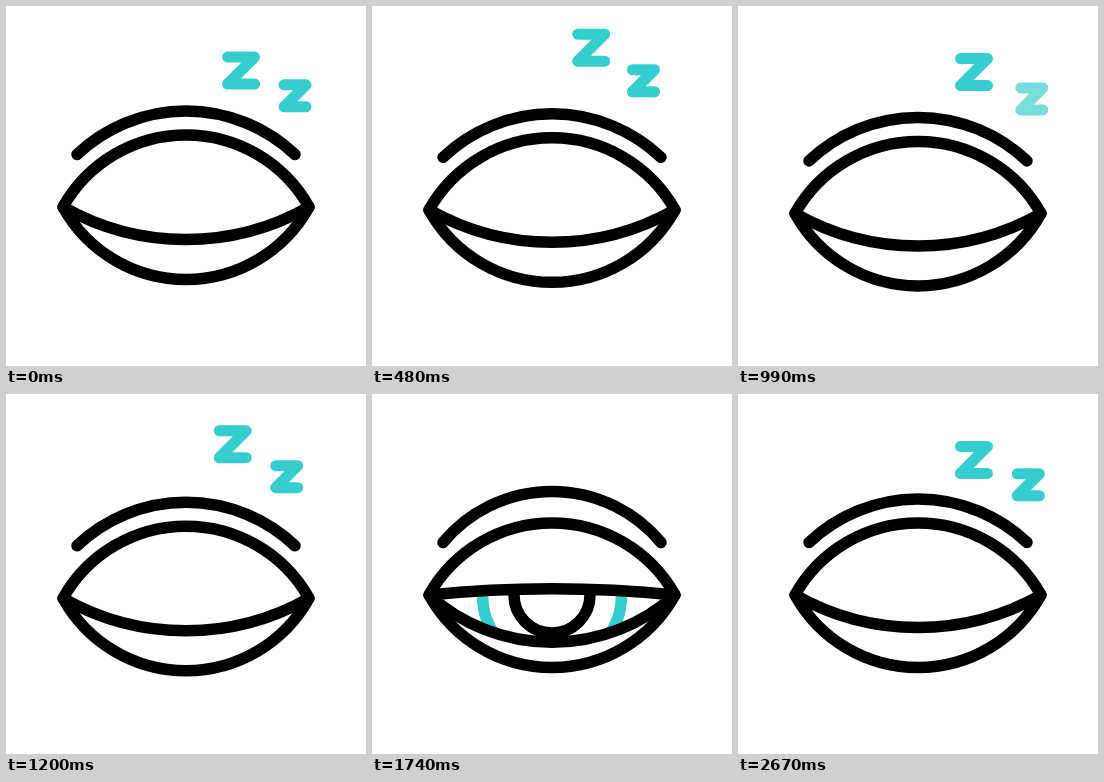
An HTML page with a canvas for the animation above (2700 ms loop, 360 by 360 pixels).

```html
<!DOCTYPE html>
<html lang="en">
<head>
<meta charset="utf-8">
<style>
  html, body { margin: 0; width: 100%; height: 100%; overflow: hidden; background: #fff; }
  canvas { display: block; }
</style>
</head>
<body>
<canvas width="360" height="360"></canvas>
<script>
const LOOP = 2700;
const BLACK = '#000', TEAL = '#35cdcd', GRAY = '#d6d6d6';
const ctx = document.querySelector('canvas').getContext('2d');
ctx.lineCap = ctx.lineJoin = 'round';

const ramp = (t, from, to) => Math.min(1, Math.max(0, (t - from) / (to - from)));
const mix = (a, b, k) => a + (b - a) * k;
const easeOut = k => 1 - (1 - k) ** 2;
const easeInOut = k => Math.sin(k * Math.PI / 2) ** 2;

// Circular arc command to (x, y) across a chord; positive sag hangs downward.
function arcTo(x, y, half, sag, clockwise) {
  const s = Math.max(Math.abs(sag), 0.01);
  const r = (half * half + s * s) / (2 * s);
  return `A${r} ${r} 0 0 ${+clockwise} ${x} ${y}`;
}

const curve = (y, half, sag) =>
  new Path2D(`M${180 - half} ${y}` + arcTo(180 + half, y, half, sag, sag < 0));

const lens = (top, bottom) => new Path2D(
  'M57 201' + arcTo(303, 201, 123, top, top < 0) + arcTo(57, 201, 123, bottom, bottom > 0) + 'Z');

function stroke(path, color = BLACK, width = 11.5) {
  ctx.strokeStyle = color;
  ctx.lineWidth = width;
  ctx.stroke(path);
}

function circle(y, radius) {
  const path = new Path2D();
  path.arc(180, y, radius, 0, Math.PI * 2);
  return path;
}

function drawEye(t) {
  const open = easeOut(ramp(t, 1640, 2130)) * (1 - easeOut(ramp(t, 2220, 2405)));
  const dip = 7.5 * easeInOut(ramp(t, 240, 810)) * easeInOut(ramp(t, 1530, 810));
  const upper = mix(32.5, -72, open), lower = mix(32.5, 72.5, open);

  ctx.save();
  ctx.translate(0, dip);
  stroke(curve(148.5, 109, mix(-43.5, -64, open)));
  if (open > 0) {
    ctx.save();
    ctx.clip(lens(upper, lower));
    stroke(circle(201, 69.5), TEAL);
    stroke(circle(201, 38));
    ctx.restore();
  }
  stroke(lens(upper, lower));
  stroke(lens(-72, 72.5));
  ctx.restore();
}

// A letter drifts up and left with a slight sway, fading at both ends.
function drawLetter(age, life, x, y, dx, dy, size) {
  if (age < 0 || age >= life) return;
  const k = (age / life) ** 1.1;
  const left = x - dx * k - 2.2 * Math.sin(k * Math.PI * 2) - size;
  const top = y - dy * k - size;
  const side = 2 * size;
  ctx.globalAlpha = ramp(age, 0, 180) * ramp(age, life, life - 70);
  stroke(new Path2D(`M${left} ${top}h${side}l${-side} ${side}h${side}`), TEAL, 11);
  ctx.globalAlpha = 1;
}

// Two letters, the second one delayed; a dot lingers after them until the rest ends.
function drawSnore(t, start, life, rest) {
  const delay = 120;
  const age = (t - start + LOOP) % LOOP;
  drawLetter(age, life, 251, 82, 38, 46, 13.5);
  drawLetter(age - delay, life, 303, 98, 45, 31, 11);
  if (age >= life + delay && age < life + delay + rest) {
    ctx.fillStyle = GRAY;
    ctx.beginPath();
    ctx.ellipse(272.5, 55, 8, 6.5, -Math.PI / 4, 0, Math.PI * 2);
    ctx.fill();
  }
}

function frame() {
  const t = performance.now() % LOOP;
  ctx.clearRect(0, 0, 360, 360);
  drawEye(t);
  drawSnore(t, 2280, 1015, 65);
  drawSnore(t, 750, 630, 180);
  requestAnimationFrame(frame);
}
frame();
</script>
</body>
</html>
```
